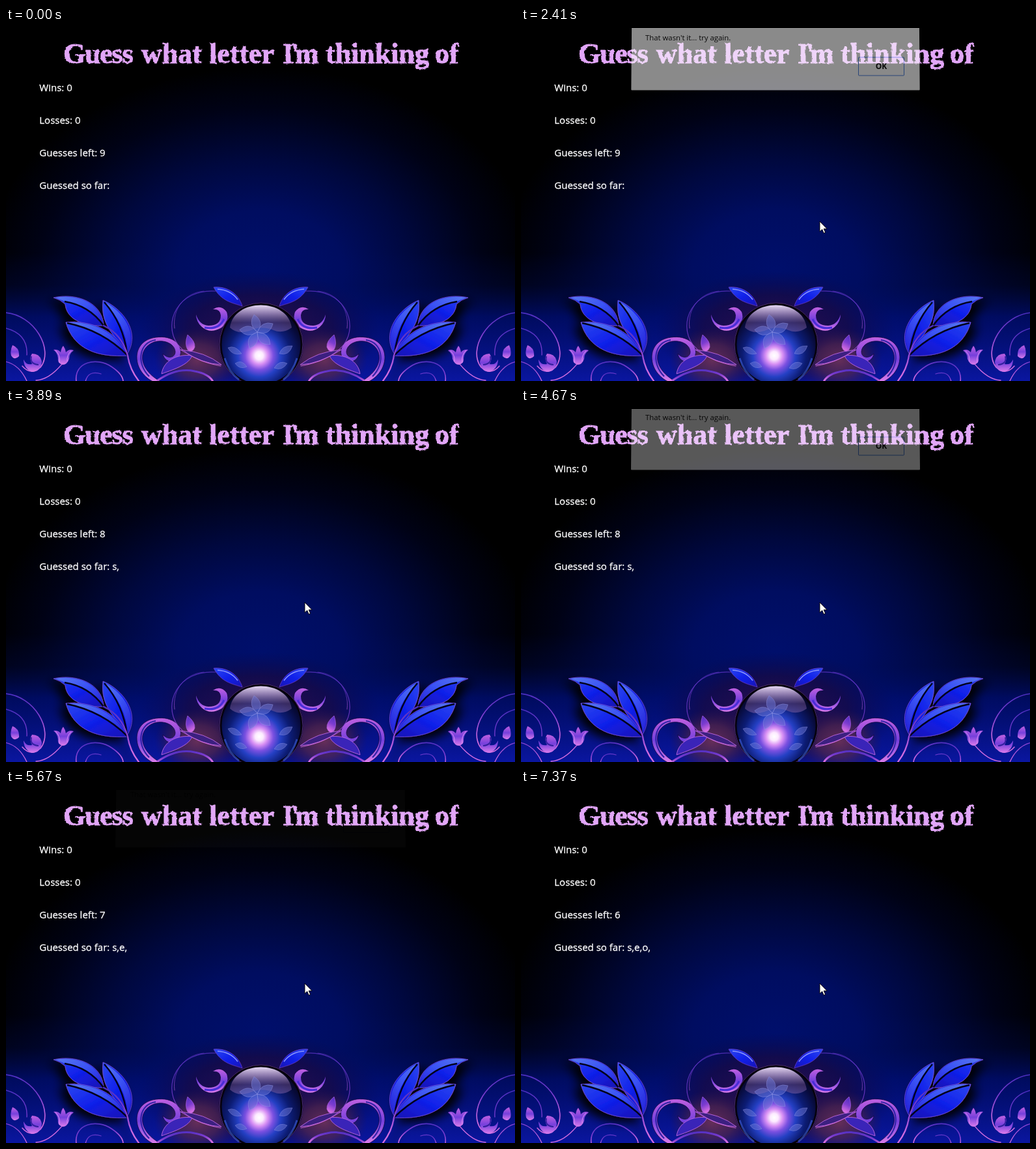
An HTML page that plays this animation: 782 px wide and 542 px high, repeating every 8000 ms.

```html
<!DOCTYPE html>
<html lang="en">
<head>
<meta charset="utf-8">
<title>Guess the letter</title>
<style>
  html, body { margin: 0; width: 100%; height: 100%; overflow: hidden; background: #000; }
  svg { display: block; }
  .stats { font: 15px "Open Sans", sans-serif; fill: #fff; stroke: #fff; stroke-width: .3; }
  .title { font: bold 44px "Liberation Serif", serif; fill: #e2a6f8; stroke: #e2a6f8; stroke-width: .9; }
  .dialog { font: 11.35px "Open Sans", sans-serif; fill: #111; }
  .line { fill: none; stroke: url(#vine); stroke-linecap: round; }
</style>
</head>
<body>
<svg width="782" height="542" viewBox="0 0 782 542">
  <defs>
    <radialGradient id="sky" gradientUnits="userSpaceOnUse" cx="0" cy="0" r="1" gradientTransform="translate(391 375) scale(425 315)">
      <stop offset="0" stop-color="#000f6c"/><stop offset=".3" stop-color="#000d60"/>
      <stop offset=".55" stop-color="#00083e"/><stop offset=".8" stop-color="#000216"/><stop offset="1" stop-color="#000"/>
    </radialGradient>
    <linearGradient id="floor" x1="0" y1="0" x2="0" y2="1">
      <stop offset="0" stop-color="#000e70" stop-opacity="0"/><stop offset=".25" stop-color="#000d60" stop-opacity=".25"/>
      <stop offset=".5" stop-color="#000e74" stop-opacity=".8"/><stop offset="1" stop-color="#0a16a0"/>
    </linearGradient>
    <radialGradient id="dusk">
      <stop offset="0" stop-color="#34104e" stop-opacity=".95"/><stop offset=".6" stop-color="#180a44" stop-opacity=".75"/>
      <stop offset="1" stop-color="#0a0a50" stop-opacity="0"/>
    </radialGradient>
    <radialGradient id="ember">
      <stop offset="0" stop-color="#6a3058" stop-opacity=".95"/><stop offset=".5" stop-color="#52264e" stop-opacity=".7"/>
      <stop offset="1" stop-color="#301448" stop-opacity="0"/>
    </radialGradient>
    <linearGradient id="leaf" x1="0" y1="0" x2="1" y2="1">
      <stop offset="0" stop-color="#2c48f0"/><stop offset=".5" stop-color="#1020ea"/><stop offset="1" stop-color="#1814b4"/>
    </linearGradient>
    <linearGradient id="sheen" x1="0" y1="0" x2="1" y2="1">
      <stop offset="0" stop-color="#5878f0"/><stop offset=".5" stop-color="#3a52f4"/><stop offset="1" stop-color="#2420d8"/>
    </linearGradient>
    <linearGradient id="vine" x1="0" y1="0" x2=".3" y2="1">
      <stop offset="0" stop-color="#4a2ec0"/><stop offset=".55" stop-color="#7c3cd0"/><stop offset="1" stop-color="#d46ce0"/>
    </linearGradient>
    <linearGradient id="petal" x1="0" y1="0" x2="0" y2="1">
      <stop offset="0" stop-color="#c060e0"/><stop offset=".5" stop-color="#7640dc"/><stop offset="1" stop-color="#dc7cec"/>
    </linearGradient>
    <radialGradient id="glass" gradientUnits="userSpaceOnUse" cx="389" cy="503" r="78">
      <stop offset="0" stop-color="#fff"/><stop offset=".08" stop-color="#fdeaff"/><stop offset=".17" stop-color="#d890f4"/>
      <stop offset=".28" stop-color="#7a50e0"/><stop offset=".42" stop-color="#2440c4"/>
      <stop offset=".62" stop-color="#0c1c74"/><stop offset=".85" stop-color="#070a3a"/><stop offset="1" stop-color="#05051e"/>
    </radialGradient>
    <linearGradient id="shine" x1="0" y1="0" x2="0" y2="1">
      <stop offset="0" stop-color="#f2e4ff" stop-opacity=".95"/><stop offset=".3" stop-color="#b098cc" stop-opacity=".8"/>
      <stop offset=".65" stop-color="#58407c" stop-opacity=".6"/><stop offset="1" stop-color="#7a60a8" stop-opacity=".55"/>
    </linearGradient>
    <filter id="shade" x="-20%" y="-30%" width="140%" height="160%">
      <feDropShadow dx="-10" dy="6" stdDeviation="8" flood-color="#000006"/>
    </filter>
    <filter id="worn" color-interpolation-filters="sRGB">
      <feTurbulence type="fractalNoise" baseFrequency=".2" numOctaves="2" seed="4"/>
      <feDisplacementMap in="SourceGraphic" scale="3.2" xChannelSelector="R" yChannelSelector="G"/>
    </filter>
    <path id="bell" d="M-15-10Q-8-11-4-6Q-3-13 0-16Q3-12 4-6Q9-12 16-9Q9-4 9 4Q6 13-1 13Q-9 11-8 3Q-9-5-15-10Z"/>

    <g id="ornament">
      <g filter="url(#shade)">
        <g fill="url(#leaf)" stroke="#7a50d0" stroke-width=".8">
          <path d="M73 414C110 406 148 422 150 457C116 458 93 446 91 424Q84 417 73 414Z"/>
          <path d="M149 418C178 430 208 466 186 501C176 478 144 462 149 418Z"/>
          <path d="M92 452C126 448 170 462 187 503C142 506 104 494 92 452Z"/>
        </g>
        <g fill="url(#sheen)">
          <path d="M76 414C110 408 145 422 149 454Q126 425 91 420Z"/>
          <path d="M150 420C176 432 204 466 187 497Q184 454 150 420Z"/>
          <path d="M95 453C126 450 164 462 184 498Q142 462 95 453Z"/>
        </g>
        <g fill="none" stroke="#04041c" stroke-width="2.4">
          <path d="M90 420Q128 426 150 457"/><path d="M151 421Q180 454 186 500"/><path d="M94 453Q148 464 187 503"/>
        </g>
        <path class="line" stroke-width="2.2" d="M150 457Q178 470 187 503Q190 524 204 542"/>
      </g>

      <!-- outer curl with its flowers -->
      <path class="line" stroke-width="1.6" d="M-2 437C44 440 74 494 53 521Q38 534 25 519"/>
      <path class="line" stroke-width="1.3" d="M0 461Q34 470 32 502M-2 512Q20 516 32 542M86 516Q66 540 46 541"/>
      <path fill="url(#petal)" d="M27 509Q31 518 40 516Q35 507 40 500Q53 500 55 513Q53 528 40 528Q27 523 27 509Z"/>
      <path fill="none" stroke="#3420a0" stroke-width="2" d="M39 504Q36 516 50 517"/>
      <path fill="url(#petal)" d="M10 487Q21 491 20 504Q13 511 8 503Q6 495 10 487Z"/>
      <use href="#bell" x="88" y="504" fill="url(#petal)"/>
      <path fill="none" stroke="#f0a0f8" stroke-width=".8" d="M76 495Q84 502 82 514M100 496Q93 502 94 512"/>
      <path class="line" stroke-width="1.6" d="M108 543C104 512 140 505 162 520Q180 532 180 543"/>
      <path class="line" stroke-width="1.3" d="M122 543Q126 525 146 531"/>

      <!-- inner scrolls -->
      <path fill="url(#petal)" stroke="#140a40" stroke-width=".8" d="M226 543C192 526 192 480 230 475C256 471 274 487 267 505C261 517 243 514 241 500C249 509 260 506 260 497C259 484 242 478 228 482C202 491 202 524 238 543Z"/>
      <path fill="none" stroke="#3022a4" stroke-width="2" d="M220 535C199 514 205 482 230 479"/>
      <path fill="#3a24b8" stroke="#c068e0" stroke-width=".9" d="M239 531C242 511 262 500 286 503C281 516 262 523 239 531Z"/>
      <path fill="#3c2080" stroke="#c068e0" stroke-width=".9" d="M268 494Q306 497 331 517Q302 516 268 494Z"/>
      <path class="line" stroke-width="3" d="M233 541Q262 521 290 527Q312 531 318 543"/>
      <path fill="url(#vine)" stroke="#b060e0" stroke-width=".7" d="M279 471Q291 481 290 490Q286 500 279 494Q274 485 279 471Z"/>
      <path class="line" stroke-width="1.2" opacity=".8" d="M322 404C264 400 240 453 264 486Q283 510 330 519"/>
      <path class="line" stroke-width="1" opacity=".6" d="M304 404C276 406 255 430 259 461"/>
      <path fill="url(#petal)" d="M292 440Q297 456 311 457Q330 457 330 441Q329 431 318 432Q330 424 339 436Q344 450 331 460Q314 470 301 459Q292 451 292 440Z"/>
      <path fill="none" stroke="#4a2cd8" stroke-width="3" d="M305 460Q327 464 335 447"/>
      <path fill="url(#leaf)" stroke="#6a3cc0" stroke-width=".8" d="M319 398C341 396 358 409 363 427C348 422 331 420 319 398Z"/>
      <path fill="none" stroke="#8a94fc" stroke-width="1.6" d="M325 401Q345 402 356 417"/>
    </g>
  </defs>

  <rect width="782" height="542" fill="url(#sky)"/>
  <rect y="345" width="782" height="197" fill="url(#floor)"/>
  <ellipse cx="391" cy="465" rx="185" ry="92" fill="url(#dusk)"/>
  <ellipse cx="294" cy="510" rx="66" ry="50" fill="url(#ember)"/>
  <ellipse cx="489" cy="510" rx="66" ry="50" fill="url(#ember)"/>
  <use href="#ornament"/>
  <use href="#ornament" transform="matrix(-1 0 0 1 783 0)"/>

  <g>
    <circle cx="392" cy="486" r="62.5" fill="url(#glass)" stroke="#06020e" stroke-width="4"/>
    <circle cx="392" cy="486" r="64" fill="none" stroke="#5c3890" stroke-width=".8"/>
    <path fill="url(#shine)" d="M344 460C350 414 433 414 439 460Q425 470 411 464Q392 456 374 465Q356 471 344 460Z"/>
    <g fill="#6a74d4" fill-opacity=".5" stroke="#a4a4ec" stroke-opacity=".45" stroke-width=".7">
      <path id="blade" d="M386 467Q371 455 381 440Q398 451 386 467Z"/>
      <use href="#blade" transform="rotate(72 386 467)"/><use href="#blade" transform="rotate(144 386 467)"/>
      <use href="#blade" transform="rotate(216 386 467)"/><use href="#blade" transform="rotate(288 386 467)"/>
      <path d="M341 491Q352 486 362 500Q348 504 341 491ZM420 500Q424 487 440 488Q435 504 420 500ZM352 515Q362 508 370 520Q359 525 352 515ZM412 522Q420 509 432 515Q424 527 412 522Z"/>
    </g>
    <path fill="none" stroke="#3c60e0" stroke-opacity=".6" stroke-width="3" d="M336 507Q342 528 358 540M447 507Q441 528 426 540"/>
  </g>

  <g class="title" filter="url(#worn)">
    <text x="88" y="54" letter-spacing="-1.2">Guess</text>
    <text x="208" y="54">what</text>
    <text x="312" y="54">letter</text>
    <text x="425 438 444" y="54">I'm</text>
    <text x="491" y="54">thinking</text>
    <text x="659" y="54">of</text>
  </g>
  <g class="stats">
    <text x="51.3" y="97">Wins: 0</text>
    <text x="51.3" y="147">Losses: 0</text>
    <text x="51.3" y="197" id="left"></text>
    <text x="51.3" y="247" id="guessed"></text>
  </g>

  <g class="dialog" id="dialog">
    <path id="panel" fill="#fbfbfb" stroke="#fbfbfb" stroke-linejoin="round" stroke-width="2"/>
    <g id="content">
      <text x="191" y="0" font-size="12.5">jumbo guess online says:</text>
      <text x="191" y="29">That wasn't it... try again.</text>
      <rect x="518.5" y="55.5" width="70" height="28" rx="1" fill="#f9f9f9" stroke="#4a7fdc"/>
      <text x="553.5" y="73" text-anchor="middle" font-size="12" font-weight="bold">OK</text>
    </g>
  </g>
  <path id="cursor" fill="#fff" stroke="#000" stroke-width=".9" d="M0 0V15.5L3.7 12.2L6.2 18L8.6 17L6.2 11.3H11Z"/>
</svg>
<script>
const LOOP = 8000;
const el = id => document.getElementById(id);
const guesses = [[3750, "s"], [5510, "e"], [7150, "o"]];

// time, x, y
const cursorKeys = [
  [0, -50, 0], [70, 680, 483], [150, 592, 255], [230, 486, 20], [310, -50, 0],
  [1250, 464, 3], [1330, 446, 96], [1410, 439, 196], [1490, 450, 267], [1570, 459, 297]
];
// time, opacity, lift
const dialogKeys = [
  [0, 0, 18],
  [2410, .55, 10.5], [2490, .95, 3.5], [2570, 1, 0],
  [3750, .99, 3.5], [3820, .5, 11], [3890, 0, 18],
  [4670, .35, 12.5], [4740, .88, 5], [4820, 1, 0],
  [5510, .99, 3.5], [5590, .5, 11], [5670, .02, 18],
  [6440, .5, 11], [6520, .95, 3.5], [6600, 1, 0],
  [7150, .99, 3.5], [7220, .6, 9.5], [7290, .15, 15], [7370, 0, 18]
];
const held = (keys, t) => keys.filter(k => k[0] <= t).pop();

function draw(now) {
  const t = now % LOOP;
  const made = guesses.filter(g => g[0] <= t);
  el("left").textContent = "Guesses left: " + (9 - made.length);
  el("guessed").textContent = "Guessed so far: " + made.map(g => g[1] + ",").join("");

  const [, x, y] = held(cursorKeys, t);
  el("cursor").setAttribute("transform", `translate(${x} ${y})`);

  // The panel leans towards the viewer while it is lifted.
  const [, opacity, lift] = held(dialogKeys, t);
  const flare = lift * .16, bottom = 105 - lift;
  el("dialog").setAttribute("opacity", opacity);
  el("panel").setAttribute("d", `M${172 - flare / 2}-9H${610 + flare / 2}L${610 + flare} ${bottom}H${172 - flare}Z`);
  el("content").setAttribute("transform", `translate(0 ${-lift})`);
  requestAnimationFrame(draw);
}
draw(0);
</script>
</body>
</html>
```
